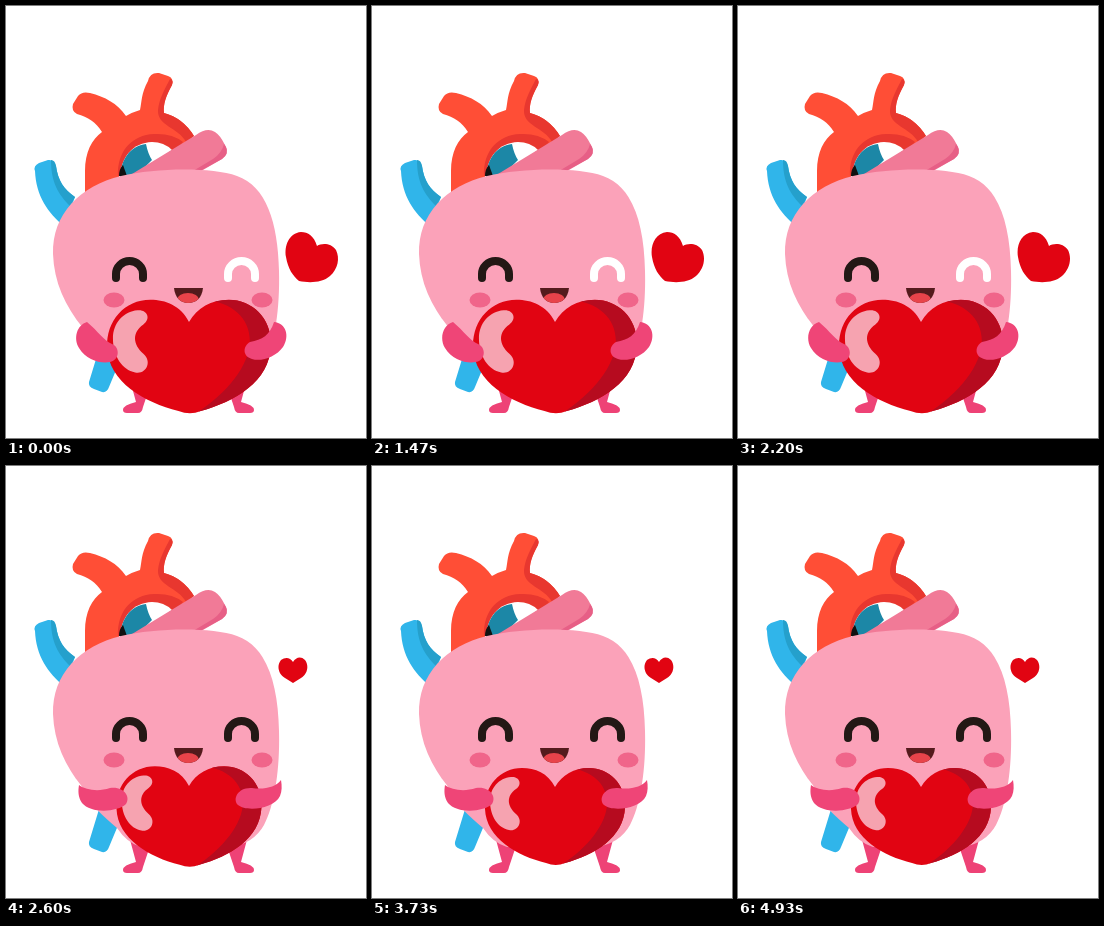
These frames come from a looping animation (360x432 px, 5000 ms). An HTML page:

```html
<!DOCTYPE html>
<html lang="en">
<head>
<meta charset="utf-8">
<title>Heart hug</title>
<style>
  html, body { margin: 0; width: 100%; height: 100%; overflow: hidden; background: #fff; }
  svg { display: block; width: 360px; height: 432px; }
  .line { fill: none; stroke-linecap: round; stroke-linejoin: round; }
</style>
</head>
<body>
<svg viewBox="0 0 360 432">
  <defs>
    <path id="heart" d="M183 321C176 307 163 302 150 302C128 302 112 320 113 343C114 372 145 390 174 397Q184 401 193 397C222 389 252 372 253 341C254 318 237 302 217 302C202 302 190 309 183 321Z"/>
    <clipPath id="inHeart"><use href="#heart"/></clipPath>
    <path id="mouth" d="M168 282H197C196 292 190 297 182 297C175 297 169 292 168 282Z"/>
    <clipPath id="inMouth"><use href="#mouth"/></clipPath>
    <path id="eye" class="line" stroke-width="8" d="M110 272V268A13.5 13 0 0 1 137 268V272"/>
    <path id="leg" d="M123 370L130 396Q117 399 117 404Q117 407 121 407H132Q136 407 137 401L144 380Z"/>
  </defs>

  <!-- blue vessels -->
  <g fill="#30b5ea">
    <path d="M29 165Q27 160 33 157L42 154Q48 153 50 160C52 175 58 183 69 191L58 220C42 207 30 190 29 165Z"/>
    <path d="M94 340L83 376Q82 381 88 383L96 386Q101 387 103 381L118 345Z"/>
  </g>
  <path fill="#25a0cc" d="M45 154Q49 154 50 160C52 175 58 183 69 191L64 200C52 188 45 176 45 154Z"/>

  <!-- red arch -->
  <path fill="#ff4e36" d="M79 195V165C79 146 86 133 96 126C90 116 82 111 71 108Q65 105 67 98L72 90Q76 85 84 87C99 91 111 97 120 110Q127 106 134 104C136 95 135 88 142 75Q144 66 153 67L162 70Q168 72 166 79C160 90 157 98 158 107Q177 112 188 130L150 165H113V195Z"/>
  <path fill="#e8372f" d="M164 73Q168 74 166 79C160 90 157 98 158 107Q177 112 188 130L180 136C172 121 151 120 152 104C153 94 157 86 164 73Z"/>
  <path fill="#e8372f" d="M112 170C111 145 126 129 148 128Q166 127 177 136L150 165Z"/>
  <path fill="#fff" d="M114 172C115 150 127 137 146 136Q158 136 166 144L130 170Z"/>
  <path fill="#1c87a6" d="M114 172C115 153 124 140 140 138Q142 148 146 154L130 170Z"/>
  <path fill="#111" d="M113 170Q113 163 117 159L121 170Z"/>

  <!-- pink vessel -->
  <path fill="#f17a97" d="M126 168L190 129Q201 121 209 126Q214 129 219 139Q224 147 216 153L190 168Z"/>
  <path fill="#e75f86" d="M182 168L207 153Q216 147 218 138L220 141Q223 148 216 153L194 165Z"/>

  <g fill="#ee4276">
    <use href="#leg"/>
    <use href="#leg" transform="matrix(-1 0 0 1 365 0)"/>
  </g>
  <path fill="#fba2b9" d="M47 248C46 208 74 180 115 170C150 162 205 161 231 170C260 180 272 216 273 265C274 302 269 338 258 359Q248 377 225 381H135Q121 377 111 362C97 350 84 339 77 322C59 300 48 276 47 248Z"/>

  <!-- face -->
  <use href="#eye" stroke="#231815"/>
  <use id="wink" href="#eye" x="112"/>
  <g fill="#f0658a">
    <ellipse cx="108" cy="294" rx="10.5" ry="7.5"/>
    <ellipse cx="256" cy="294" rx="10.5" ry="7.5"/>
  </g>
  <use href="#mouth" fill="#541a1c"/>
  <ellipse cx="182" cy="294" rx="11" ry="7" fill="#e8434a" clip-path="url(#inMouth)"/>

  <!-- hugged heart -->
  <g id="hug">
    <use href="#heart" fill="#e10412"/>
    <path clip-path="url(#inHeart)" fill="#b60b1f" d="M196 302C220 304 235 318 235 337C235 358 215 383 186 401H260V298H196Z"/>
    <path fill="#f6a3b0" d="M139 311C147 310 151 318 144 323C134 330 135 340 144 348C152 355 146 366 137 364C126 362 118 350 118 335C118 322 127 312 139 311Z"/>
  </g>

  <g id="wide">
    <g fill="#ef4577">
      <path d="M81 316C71 319 67 332 73 342C80 354 95 358 104 356C114 354 114 341 106 338C98 335 92 325 81 316Z"/>
      <path d="M268 316C280 317 284 330 277 341C270 351 255 356 246 353C236 350 237 340 244 336C256 334 264 329 268 316Z"/>
    </g>
    <path fill="#e10412" d="M311 240C308 230 302 226 295 226C283 227 278 240 280 251C282 263 287 270 293 275C303 277 316 277 324 270C332 263 334 252 330 244C325 237 316 237 311 240Z"/>
  </g>
  <g id="tight">
    <g fill="#ef4577">
      <path d="M73 319C80 324 92 326 104 322C118 320 125 331 120 338C112 346 85 348 76 337C72 331 72 325 73 319Z"/>
      <path d="M275 314C270 321 258 324 246 322C232 321 226 333 232 339C240 346 268 343 274 330C276 325 276 320 275 314Z"/>
    </g>
    <path fill="#e10412" d="M287 196C284 191 279 191 275 194C270 200 273 209 279 212L287 217L295 212C302 208 303 199 299 194C295 190 290 191 287 196Z"/>
  </g>
</svg>
<script>
  const LOOP = 5000, FPS = 15, BEAT = 1040, GROWTH = 0.17;
  const el = id => document.getElementById(id);
  const show = (id, on) => el(id).setAttribute('visibility', on ? 'visible' : 'hidden');
  const clamp = v => Math.min(1, Math.max(0, v));

  function draw(ms) {
    const t = Math.floor(ms % LOOP * FPS / 1000 + 0.06) / FPS * 1000;
    const swell = clamp(0.5 + 1.6 * (Math.cos(2 * Math.PI * (t / BEAT - 0.17)) + 0.3));
    const open = swell > 0.5;
    const s = 1 + GROWTH * swell;
    el('hug').setAttribute('transform', `translate(183 350) scale(${s}) translate(-183 -350)`);
    el('wink').setAttribute('stroke', open ? '#fff' : '#231815');
    show('wide', open);
    show('tight', !open);
  }

  const start = performance.now();
  function tick() {
    draw(performance.now() - start);
    requestAnimationFrame(tick);
  }
  tick();
</script>
</body>
</html>
```
